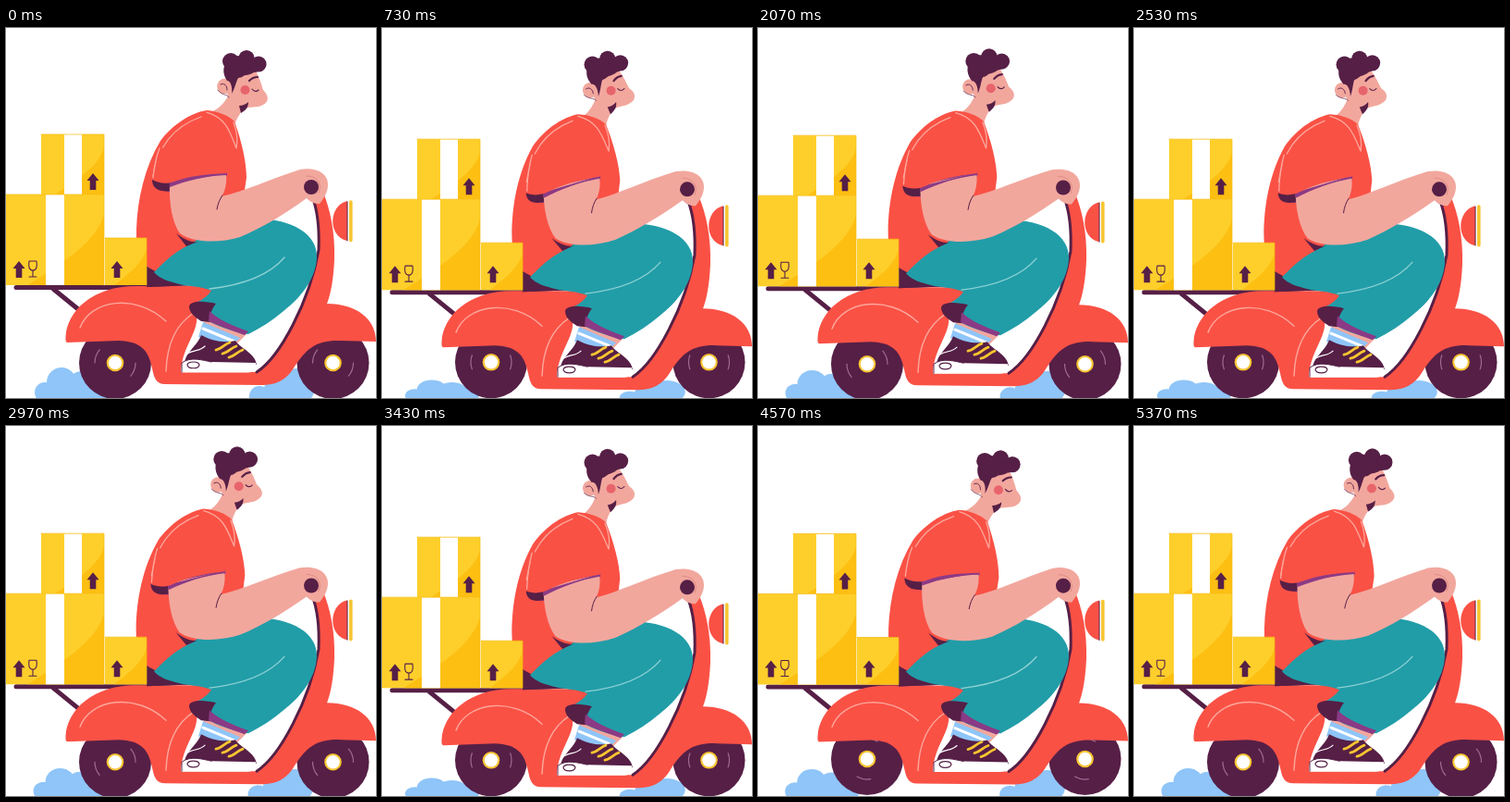
An HTML page with a canvas for the animation above (5.41 s loop, 400x400 px).

```html
<!DOCTYPE html>
<html lang="en">
<head>
<meta charset="utf-8">
<title>Delivery scooter</title>
<style>
html, body { margin: 0; width: 100%; height: 100%; overflow: hidden; background: #fff; }
canvas { display: block; width: 100vw; height: 100vh; }
</style>
</head>
<body>
<canvas id="stage"></canvas>
<script>
const canvas = document.getElementById('stage');
const ctx = canvas.getContext('2d');
const LOOP = 5410, STEPS = 162, STEP = 100 / 3, SWAY = 27, BUMP = 9;
const TAU = Math.PI * 2;
const RED = '#fa5145', TEAL = '#219da8', DARK = '#561f46', SKIN = '#f2a79d',
  PURPLE = '#8b3a85', PINK = '#fda79c', BLUE = '#8fc5f8', YELLOW = '#fecf2b',
  AMBER = '#fdbf12', GOLD = '#f7c531';

const clamp = v => Math.min(1, Math.max(0, v));

// Each part has a map that moves its points; paths are written in the rest pose.
const trace = (d, map) => new Path2D(d.replace(/(-?[\d.]+),(-?[\d.]+)/g,
  (m, x, y) => map(+x, +y).map(v => v.toFixed(2)).join(',')));

function fill(map, color, d) {
  ctx.fillStyle = color;
  ctx.fill(trace(d, map));
}

function line(map, color, width, d) {
  ctx.strokeStyle = color;
  ctx.lineWidth = width;
  ctx.stroke(trace(d, map));
}

function dot(map, color, x, y, r, ry = r) {
  const [cx, cy] = map(x, y);
  ctx.fillStyle = color;
  ctx.beginPath();
  ctx.ellipse(cx, cy, r, ry, 0, 0, TAU);
  ctx.fill();
}

function spin(x, y, cx, cy, a) {
  const c = Math.cos(a), s = Math.sin(a);
  return [cx + (x - cx) * c - (y - cy) * s, cy + (x - cx) * s + (y - cy) * c];
}

function pose(p) {
  const lift = 2.8 - 2.9 * Math.cos(TAU * (p - 0.4) / BUMP);
  const lean = Math.cos(TAU * (p - 2.3) / SWAY) - 0.86;
  const body = (x, y) => [x, y + lift];
  const torso = (x, y) => body(...spin(x, y, 190, 235, lean * 0.037));
  const head = (x, y) => torso(...spin(x, y, 238, 105, lean * 0.12));
  const hand = (x, y) => [x, y + lift * 0.45];
  const arm = (x, y) => {
    const w = clamp((330 - x) / 90);
    const a = torso(x, y), b = hand(x, y);
    return [b[0] + (a[0] - b[0]) * w, b[1] + (a[1] - b[1]) * w];
  };
  const sleeve = (x, y) =>
    torso(x, y - lean * 8 * clamp((239 - x) / 80) * clamp((y - 125) / 35));
  return { lift, body, torso, head, hand, arm, sleeve, turn: TAU * p / BUMP,
    hop: -2 * Math.sin(TAU * p / BUMP) };
}

function smoke(lift) {
  const k = 1 - lift * 0.075;
  const low = (x, y) => [x - lift * 1.2, 402 - (402 - y) * k];
  const puffs = [[42, 394, 11], [60, 383, 16], [82, 387, 16], [97, 394, 14],
    [274, 398, 11], [294, 391, 15], [314, 388, 20]];
  for (const [x, y, r] of puffs) dot(low, BLUE, x, y, r, r * k);
  fill(low, BLUE, 'M36,392 L105,390 L105,406 L31,406Z');
  fill(low, BLUE, 'M270,394 L325,386 L325,406 L264,406Z');
}

function wheel(x, hop, turn) {
  const at = (a, b) => [a, b + hop];
  dot(at, DARK, x, 362, 39);
  ctx.strokeStyle = '#a06d91';
  ctx.lineWidth = 1.2;
  for (const a of [0, Math.PI]) {
    ctx.beginPath();
    ctx.arc(x, 362 + hop, 22, a + turn, a + turn + 0.7);
    ctx.stroke();
  }
  dot(at, GOLD, x, 362, 9.3);
  dot(at, '#fff', x, 362, 7.2);
}

function box(m, x, y, w, h, stripe, sw) {
  const r = x + w, b = y + h;
  fill(m, YELLOW, `M${x},${y} L${r},${y} L${r},${b} L${x},${b}Z`);
  fill(m, AMBER, `M${r},${y + h * 0.22} C${r - w * 0.08},${y + h * 0.5} ${r - w * 0.33},${y + h * 0.7} ${x + w * 0.22},${b} L${r},${b}Z`);
  if (sw) fill(m, '#fff', `M${stripe},${y} L${stripe + sw},${y} L${stripe + sw},${b} L${stripe},${b}Z`);
  line(m, '#f5b90e', 0.7, `M${x},${y} L${r},${y} L${r},${b}`);
}

function arrow(m, x, y) {
  fill(m, DARK, `M${x},${y - 9} L${x + 6.5},${y - 1} L${x + 3.3},${y - 1} L${x + 3.3},${y + 9} L${x - 3.3},${y + 9} L${x - 3.3},${y - 1} L${x - 6.5},${y - 1}Z`);
}

function rack(m) {
  line(m, DARK, 5, 'M51,282 L78,304');
  line(m, DARK, 5, 'M11,280.5 L160,280.5');
}

function cargo(m) {
  box(m, 38, 115, 68, 65, 63, 19);
  box(m, 0, 180, 106, 98, 43, 20);
  box(m, 107, 227, 45, 51);
  arrow(m, 94, 166);
  arrow(m, 14, 261);
  arrow(m, 120, 261);
  line(m, DARK, 1.1, 'M25,252 L33,252 C34,258 33,262 29,262 C25,262 24,258 25,252Z M29,262 L29,269 M25,269 L33,269');
}

function scooter(m) {
  fill(m, RED, 'M64.5,334 C66,305 95,279 140,279 L228,279 C226,290 212,298 206,310 C209,328 190,345 189,372 L271,372 C296,356 328,296 338,240 C339,215 336,195 331,180 L343,178 C350,195 356,220 355,250 C354,272 351,288 347,298 C378,298 400,314 400,339 L362,338 C336,337 325,346 312,366 C303,381 292,386 275,386 L172,385 C162,385 160,378 158,368 C154,348 146,339 122,338 L66,340 C64,339 64.5,337 64.5,334Z');
  line(m, PINK, 1.4, 'M80,324 C91,294 140,286 173,317');
  line(m, PINK, 1.4, 'M203,308 C184,320 174,342 173,371');
  line(m, DARK, 3, 'M271,372 C296,356 328,296 338,240 C339,215 336,195 331,182');
  fill(m, DARK, 'M151,257 C162,264 180,272 206,278 L152,280Z');
  fill(m, RED, 'M369,187 C348,192 348,226 369,230Z');
  line(m, DARK, 1, 'M369,188 L369,230');
  line(m, GOLD, 3.6, 'M372.8,188 L372.8,229.5');
}

function foot(m) {
  fill(m, SKIN, 'M217,306 L263,328 L248,343 L211,328Z');
  fill(m, BLUE, 'M213,318 L253,335 L244,344 L208,334Z');
  line(m, '#fff', 3, 'M213,325 L247,339');
  fill(m, DARK, 'M193,363 C194,350 206,345 211,332 C222,338 235,341 248,338 C254,347 269,351 271,364Z');
  fill(m, '#fff', 'M190,362 C200,355 212,359 222,361 L270,362 C272,368 268,372 262,372.5 L190,372.5Z');
  line(m, DARK, 1, 'M190,372 L190,362 C200,355 212,359 222,361');
  line(m, DARK, 1.2, 'M196,364 C197,360 208,360 209,364 C208,369 197,369 196,364Z');
  line(m, '#fff', 1.2, 'M196,352 C204,347 209,350 215,344');
  for (let i = 0; i < 3; i++) {
    const x = 227 + i * 7, y = 348 + i * 4;
    line(m, GOLD, 2.8, `M${x},${y} C${x + 6},${y - 1} ${x + 9},${y - 6} ${x + 15},${y - 8}`);
  }
}

function leg(m) {
  fill(m, TEAL, 'M160,264 C172,252 180,244 195,236 C220,222 235,207 268,206 C310,206 337,223 336,248 C335,272 318,292 300,306 C288,316 276,324 262,331 C245,328 212,320 200,299 C205,297 215,294 222,284 C210,279 195,279 188,277 C177,274 167,272 160,264Z');
  line(m, '#8ed2d3', 1.3, 'M220,282 C255,278 284,268 301,248');
  fill(m, DARK, 'M198,301 C199,294 216,295 227,298 C222,304 220,311 221,318 L211,317 C203,312 198,307 198,301Z');
  fill(m, PURPLE, 'M220,306 C230,316 246,322 262,328 L258,332 C244,327 230,322 219,317Z');
}

function shirt(m) {
  fill(m, RED, 'M217,89 C230,90 241,95 247,101 C255,123 260,146 260,162 L252,215 L200,250 L160,266 C148,256 140,240 141,218 C142,185 150,150 167,122 C179,106 198,92 217,89Z');
  line(m, PINK, 1.3, 'M211,96 C180,107 165,128 159,160');
  line(m, PINK, 1.3, 'M217,91 C238,97 242,112 249,130 C251,120 249,110 246,102');
}

function face(m) {
  fill(m, SKIN, 'M236,58 L240,74 C234,84 227,90 217,92 C227,102 238,107 247,105 C249,98 253,92 257,88 C264,84 271,87 278,83 C285,79 284,73 278,67 C276,60 274,54 270,46 L244,46Z');
  fill(m, DARK, 'M252,84 C256,84 260,82 262,80 C262,86 259,89 254,92Z');
  dot(m, SKIN, 236.5, 63, 8.3);
  line(m, DARK, 0.9, 'M232,61 C236,59 239,62 239,67');
  line(m, DARK, 0.7, 'M229,67 C233,73 239,71 241,75');
  fill(m, DARK, 'M239,57 C234,50 234,42 239,35 L272,35 C278,42 275,48 268,48 C260,53 253,49 250,56 C248,61 247,66 244,71 C245,64 243,57 239,57Z');
  for (const [x, y, r] of [[243, 36, 9], [260, 32.5, 8.6], [273, 39, 8.6], [250, 42, 12]])
    dot(m, DARK, x, y, r);
  line(m, DARK, 2.2, 'M263,57 C266,54 269,53 272,53');
  line(m, DARK, 1.1, 'M266,66 C268,69 271,69 273,67');
  dot(m, '#e8646b', 258.5, 67, 5);
}

function arms({ torso, arm, hand, sleeve }) {
  fill(sleeve, PURPLE, 'M158,165 C164,178 182,180 193,174 L239,160 L238,154Z');
  fill(sleeve, DARK, 'M158,164 C158,174 166,178 180,176 L182,166Z');
  fill(torso, DARK, 'M184,222 C192,228 199,232 207,231 L195,236Z');
  fill(arm, SKIN, 'M177,168 L238,157 C239,167 237,177 233,182 C257,177 286,163 318,153 C335,150 348,157 348,169 C348,177 345,182 339,190 C333,190 329,188 325,184 C302,201 277,216 253,226 C230,233 201,232 188,222 C180,211 176,190 177,168Z');
  line(arm, DARK, 1, 'M234,181 C231,185 229,190 228,196');
  fill(sleeve, PURPLE, 'M176,166 L239,156 L239,159 C216,160 198,164 177,172Z');
  fill(sleeve, RED, 'M158,164 L166,130 L228,124 L239,157 C215,158 198,160 182,166 C174,169 165,168 158,164Z');
  line(sleeve, PINK, 1.3, 'M166,130 C162,140 160,151 159,162');
  dot(hand, DARK, 330, 172, 8);
  line(arm, '#d98783', 0.9, 'M325,160 C336,160 342,168 338,178');
}

function draw(p) {
  const s = pose(p);
  ctx.fillStyle = '#fff';
  ctx.fillRect(0, 0, 400, 400);
  smoke(s.lift);
  wheel(118, s.hop, s.turn);
  wheel(353.5, s.hop, s.turn);
  rack(s.body);
  scooter(s.body);
  foot(s.body);
  face(s.head);
  shirt(s.torso);
  fill(s.body, DARK, 'M151,257 C162,264 180,272 206,278 L152,280Z');
  leg(s.body);
  cargo(s.body);
  arms(s);
}

function resize() {
  const k = window.devicePixelRatio || 1;
  canvas.width = Math.round(innerWidth * k);
  canvas.height = Math.round(innerHeight * k);
  ctx.setTransform(canvas.width / 400, 0, 0, canvas.height / 400, 0, 0);
  ctx.lineCap = 'round';
  ctx.lineJoin = 'round';
}

const start = performance.now();
function tick() {
  const t = (performance.now() - start) % LOOP;
  draw(Math.min(STEPS - 1, Math.floor(t / STEP + 0.15)));
  requestAnimationFrame(tick);
}

addEventListener('resize', resize);
resize();
tick();
</script>
</body>
</html>
```
